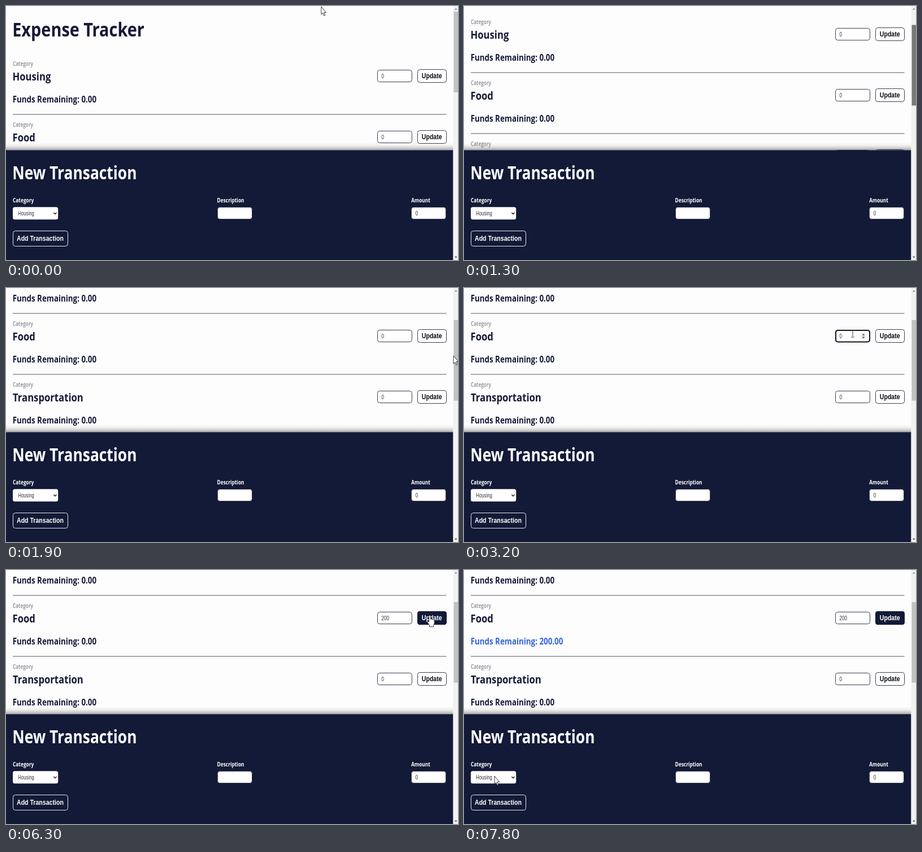
An HTML page for the animation above (8 s loop, 800 by 450 pixels).

```html
<!DOCTYPE html>
<html lang="en">
<head>
<meta charset="utf-8">
<title>Expense Tracker</title>
<style>
@property --scroll { syntax: "<number>"; inherits: true; initial-value: 0; }

:root { --navy: #131a37; }
html, body { margin: 0; width: 100%; height: 100%; overflow: hidden; background: #fefdfe; }
svg { display: block; width: 100vw; height: 100vh; animation: scroll 8s step-end infinite; }

/* The page is shown narrowed, so all type is squeezed. */
text {
  fill: var(--navy);
  font: 700 10px "Open Sans", "Noto Sans", sans-serif;
  transform: scaleX(.835); transform-box: fill-box; transform-origin: 0 0;
  white-space: pre;
}
.title { font-size: 34.6px; }
.heading { font-size: 31.6px; fill: #fff; }
.name { font-size: 20px; }
.funds { font-size: 16px; }
.muted { font-weight: 600; fill: #84868f; }
.label { fill: #fff; }
.btn { font: 700 12.3px "Liberation Sans", Arial, sans-serif; fill: #0b0d16; transform: scaleX(.86); }
.value { font: 400 10.4px "Liberation Sans", Arial, sans-serif; fill: #30323a; transform: scaleX(.78); }
.light { fill: #fff; }
.paid { fill: #3165e0; }
.box { fill: #fff; stroke: #3b3f50; }
.rule { stroke: #55565c; }

.page { transform: translateY(calc(var(--scroll) * -1px)); }
.thumb { fill: #c1c1c1; transform: translateY(calc(var(--scroll) * .318px)); }

.thumb, .caret, .cursor, .show, .hide { animation: 8s step-end infinite; }
.show { visibility: hidden; }
.thumb { animation-name: thumb; }
.caret { visibility: hidden; stroke: #111; animation-name: caret; }
.cursor { animation-name: move; }
.arrow { animation-name: arrow; }
.ibeam { animation-name: ibeam; }
.hand { animation-name: hand; }
.zero { animation-name: zero; }
.two { animation-name: two; }
.twenty { animation-name: twenty; }
.full { animation-name: full; }
.spin { animation-name: spin; }
.ring { animation-name: ring; }
.pressed { animation-name: pressed; }
.before { animation-name: before; }
.after { animation-name: after; }

@keyframes scroll {
  0% { --scroll: 0 }
  12.5% { --scroll: 2 }
  13.75% { --scroll: 9 }
  15% { --scroll: 38 }
  16.25% { --scroll: 74 }
  17.5% { --scroll: 106 }
  18.75% { --scroll: 129 }
  20% { --scroll: 142 }
  21.25%, 100% { --scroll: 147 }
}
@keyframes thumb {
  0%, 23.75%, 100% { fill: #c1c1c1 }
  6.25% { fill: #a8a8a8 }
  12.5% { fill: #787878 }
}
@keyframes move {
  0% { transform: translate(558px, 1px) }
  2.5% { transform: translate(610px, 26px) }
  3.75% { transform: translate(700px, 62px) }
  5% { transform: translate(770px, 82px) }
  6.25% { transform: translate(820px, 90px) }
  23.75% { transform: translate(792px, 120px) }
  25% { transform: translate(775px, 112px) }
  26.25% { transform: translate(745px, 102px) }
  27.5% { transform: translate(713px, 91px) }
  28.75% { transform: translate(697px, 85px) }
  30% { transform: translate(688px, 81px) }
  70% { transform: translate(694px, 82px) }
  71.25% { transform: translate(707px, 83px) }
  72.5% { transform: translate(723px, 84px) }
  73.75% { transform: translate(740px, 82px) }
  75% { transform: translate(750px, 80px) }
  83.75% { transform: translate(660px, 103px) }
  85% { transform: translate(520px, 145px) }
  86.25% { transform: translate(399px, 175px) }
  88.75% { transform: translate(345px, 203px) }
  90% { transform: translate(265px, 243px) }
  91.25% { transform: translate(185px, 285px) }
  92.5% { transform: translate(120px, 318px) }
  93.75% { transform: translate(78px, 342px) }
  95% { transform: translate(56px, 357px) }
  96.25% { transform: translate(53px, 363px) }
  97.5%, 100% { transform: translate(54px, 365px) }
}
@keyframes arrow {
  0%, 71.25%, 83.75% { visibility: visible }
  27.5%, 73.75% { visibility: hidden }
}
@keyframes ibeam { 27.5% { visibility: visible } 71.25% { visibility: hidden } }
@keyframes hand { 73.75% { visibility: visible } 83.75% { visibility: hidden } }
@keyframes caret {
  0%, 40%, 47.5%, 65%, 78.75% { visibility: hidden }
  33.75%, 43.75%, 51.25%, 56.25%, 58.75%, 71.25% { visibility: visible }
  33.75%, 40%, 51.25% { transform: translateX(669.5px) }
  43.75%, 47.5% { transform: translateX(664.5px) }
  56.25% { transform: translateX(674.5px) }
  58.75%, 65%, 71.25%, 78.75% { transform: translateX(678.5px) }
}
@keyframes zero { 43.75%, 100% { visibility: hidden } }
@keyframes two { 51.25% { visibility: visible } 56.25% { visibility: hidden } }
@keyframes twenty { 56.25% { visibility: visible } 58.75% { visibility: hidden } }
@keyframes full { 58.75%, 100% { visibility: visible } }
@keyframes spin { 27.5% { visibility: visible } 78.75% { visibility: hidden } }
@keyframes ring { 33.75% { visibility: visible } 78.75% { visibility: hidden } }
@keyframes pressed { 73.75%, 100% { visibility: visible } }
@keyframes before { 81.25%, 100% { visibility: hidden } }
@keyframes after { 81.25%, 100% { visibility: visible } }
</style>
</head>
<body>
<svg viewBox="0 0 800 450" preserveAspectRatio="none">
  <defs>
    <linearGradient id="shade" x1="0" y1="0" x2="0" y2="1">
      <stop offset="0" stop-opacity="0"/>
      <stop offset=".4" stop-opacity=".06"/>
      <stop offset=".7" stop-opacity=".19"/>
      <stop offset="1" stop-opacity=".38"/>
    </linearGradient>
    <g id="row">
      <text class="muted" x="12" y="106.5">Category</text>
      <rect class="box" x="657.5" y="113.5" width="61" height="21" rx="4"/>
      <rect class="box" x="728.5" y="112.5" width="51" height="23" rx="4"/>
      <text class="btn" x="735.8" y="127.9">Update</text>
      <path class="rule" d="M12 192H779.5"/>
    </g>
  </defs>

  <rect width="800" height="450" fill="#fefdfe"/>

  <g class="page">
    <text class="title" x="11.2" y="54">Expense Tracker</text>

    <use href="#row"/>
    <text class="name" x="11.5" y="132">Housing</text>
    <text class="value" x="664.5" y="128">0</text>
    <text class="funds" x="11.7" y="171.5">Funds Remaining: 0.00</text>

    <g transform="translate(0 108)">
      <use href="#row"/>
      <text class="name" x="11.5" y="132">Food</text>
      <rect class="show ring" x="658" y="114" width="60" height="20.5" rx="4" fill="#fff" stroke="#10131f" stroke-width="2"/>
      <text class="value hide zero" x="664.5" y="128">0</text>
      <text class="value show two" x="664.5" y="128">2</text>
      <text class="value show twenty" x="664.5" y="128">20</text>
      <text class="value show full" x="664.5" y="128">200</text>
      <path class="caret" d="M0 118.5V129.5"/>
      <g class="show spin">
        <rect x="702.5" y="118.5" width="9" height="11" fill="#efeff0"/>
        <path d="M704.6 122.8L707 120l2.4 2.8zM704.6 125.4L707 128.2l2.4-2.8z" fill="#444"/>
      </g>
      <g class="show pressed">
        <rect x="728" y="112" width="52" height="24" rx="4.5" fill="#131a37"/>
        <text class="btn light" x="735.8" y="127.9">Update</text>
      </g>
      <text class="funds hide before" x="11.7" y="171.5">Funds Remaining: 0.00</text>
      <text class="funds paid show after" x="11.7" y="171.5">Funds Remaining: 200.00</text>
    </g>

    <g transform="translate(0 216)">
      <use href="#row"/>
      <text class="name" x="12" y="132">Transportation</text>
      <text class="value" x="664.5" y="128">0</text>
      <text class="funds" x="11.7" y="171.5">Funds Remaining: 0.00</text>
    </g>
  </g>

  <rect y="242" width="791.5" height="14" fill="url(#shade)"/>
  <rect y="255.5" width="791.5" height="194.5" fill="#131a37"/>
  <text class="heading" x="11.2" y="307">New Transaction</text>
  <text class="label" x="12" y="348">Category</text>
  <text class="label" x="373.6" y="348">Description</text>
  <text class="label" x="717.2" y="348">Amount</text>
  <rect x="12" y="356.3" width="80.2" height="22" rx="3.5" fill="#fff"/>
  <rect class="box" x="374.5" y="356.5" width="61" height="21" rx="4"/>
  <rect class="box" x="717.5" y="356.5" width="61" height="21" rx="4"/>
  <text class="value" style="font-size:10px" x="21.3" y="370.6">Housing</text>
  <path d="M84.4 366l2.5 2.8 2.5-2.8" fill="none" stroke="#222" stroke-width="1.4"/>
  <text class="value" x="724.7" y="370.8">0</text>
  <rect x="12.5" y="398.5" width="97" height="27" rx="4" fill="none" stroke="#e6e7ec"/>
  <text class="btn light" x="19" y="416">Add Transaction</text>

  <rect x="791.5" width="8.5" height="450" fill="#f1f1f1"/>
  <rect class="thumb" x="792.5" y="10" width="7.5" height="142.8"/>
  <path d="M794 6.4l2.3-2.8 2.3 2.8z" fill="#8a8a8a"/>
  <path d="M794 443.8l2.3 2.8 2.3-2.8z" fill="#505050"/>

  <g class="cursor">
    <path class="hide arrow" d="M0 0V14.2L2.8 11.4 4.8 16.3 6.8 15.3 4.8 10.6H8.6Z" fill="#fff" stroke="#222" stroke-width=".9"/>
    <path class="show ibeam" d="M-3-6.2H-.8L0-5.4.8-6.2H3M0-5.4V5.4M-3 6.2H-.8L0 5.4.8 6.2H3" fill="none" stroke="#333" stroke-width=".9"/>
    <path class="show hand" d="M-1.4 1.2Q0-.8 1.4 1.2V7Q2.8 6 4 7.4 5.4 6.6 6.2 8 8 7.6 8.2 9.4V14.5L6.8 17.5V20.5H-.4V18.2L-4.2 12.6Q-4.2 10.4-2.4 11L-1.4 12.2Z" fill="#fff" stroke="#222" stroke-width=".9" stroke-linejoin="round"/>
  </g>
</svg>
</body>
</html>
```
